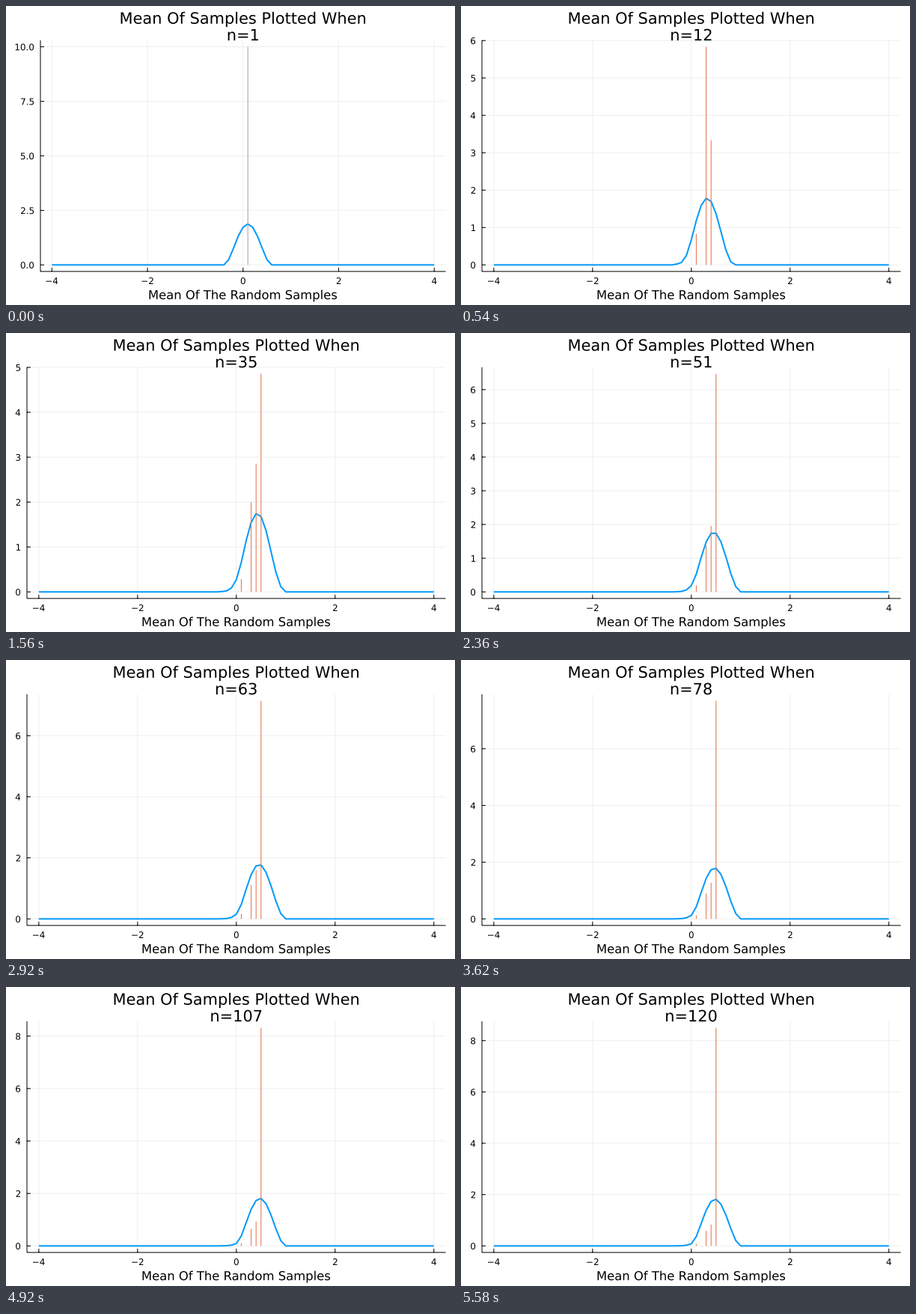
A matplotlib script for the animation above (5680 ms loop, 600 by 400 pixels).

```python
from functools import lru_cache

import numpy as np
import matplotlib.pyplot as plt
from matplotlib.animation import FuncAnimation
from matplotlib.patches import PathPatch
from matplotlib.path import Path
from matplotlib.textpath import TextPath

plt.rcParams["font.family"] = "DejaVu Sans"

W, H, DPI = 600, 400, 100
PX = 72 / DPI                     # one pixel in points
FRAMES, STEP_MS = 284, 20
TOP, BOTTOM, RIGHT = 45.8, 355.1, 587.6
PAD = 0.03                        # axis padding on each side of the data
TICK = 5
TITLE, LABEL, SMALL = 20.9, 16.42, 11.94
BLUE, ORANGE, GREY = "#009AFA", "#E36F47", "#A0A0A0"

# running means, rounded to one decimal, in the order they appear
MEANS = np.repeat([0.1, 0.3, 0.4, 0.5], [1, 7, 10, 102])
GRID = np.linspace(-4, 4, 81)
BANDWIDTH = 0.5

fig = plt.figure(figsize=(W / DPI, H / DPI), dpi=DPI, facecolor="white")
ax = fig.add_axes([0, 0, 1, 1])
ax.set(xlim=(0, W), ylim=(H, 0))
ax.axis("off")


def stroke(color, width, z):
    return ax.plot([], [], color=color, lw=width * PX, zorder=z, snap=False,
                   solid_capstyle="butt", solid_joinstyle="round")[0]


def set_segments(line, segments):
    """Show separate straight segments (x0, y0, x1, y1) with one line."""
    xs, ys = [], []
    for x0, y0, x1, y1 in segments:
        xs += [x0, x1, np.nan]
        ys += [y0, y1, np.nan]
    line.set_data(xs, ys)


@lru_cache(maxsize=None)
def outline(string, size):
    path = TextPath((0, 0), string, size=size)
    box = path.get_extents()
    return path.vertices * [1, -1], path.codes, box.x0, box.x1


class Label:
    """Text as an outline, so that it can sit between pixels."""

    def __init__(self, size, align=0.5):
        self.size, self.align = size, align
        self.patch = PathPatch(Path([(0, 0)]), fc="black", lw=0, zorder=6,
                               snap=False)
        ax.add_patch(self.patch)

    def show(self, string, x, baseline):
        vertices, codes, x0, x1 = outline(string, self.size)
        shift = x - x0 - self.align * (x1 - x0)
        self.patch.set_path(Path(vertices + [shift, baseline], codes))
        self.patch.set_visible(True)

    def hide(self):
        self.patch.set_visible(False)


grid = stroke("#EFEFEF", 1, 1)
frame = stroke("black", 1, 2)
curve = stroke(BLUE, 2, 3)
bars = stroke(ORANGE, 1, 4)

title, count, xlabel = Label(TITLE), Label(TITLE), Label(LABEL)
x_names = [Label(SMALL) for _ in range(5)]
y_names = [Label(SMALL, align=1) for _ in range(8)]


def density(samples):
    """Biweight kernel estimate on the grid."""
    u = (GRID[:, None] - samples) / BANDWIDTH
    k = 15 / 16 * np.clip(1 - u ** 2, 0, None) ** 2
    return k.mean(axis=1) / BANDWIDTH


def tick_step(n, top):
    if n == 1:
        return 2.5
    return 1 if top < 7 else 2


def sample_count(i):
    """Samples come in threes, the second one held for five ticks."""
    group, r = divmod(i, 7)
    return min(3 * group + (1 if r == 0 else 2 if r < 6 else 3), len(MEANS))


def draw(i):
    n = sample_count(i)
    samples = MEANS[:n]
    values, counts = np.unique(samples, return_counts=True)
    heights = 10 * counts / n
    peak = heights.max()
    left = 46 if n == 1 else 28
    mid = (left + RIGHT) / 2
    x_unit = (RIGHT - left) / (1 + 2 * PAD) / 8
    y_unit = (BOTTOM - TOP) / (1 + 2 * PAD) / peak
    zero = BOTTOM - PAD * peak * y_unit

    def px(x):
        return mid + x * x_unit

    def py(y):
        return zero - y * y_unit

    top = peak * (1 + PAD)
    x_ticks = np.arange(-4, 5, 2)
    y_ticks = np.arange(0, top, tick_step(n, top))

    set_segments(grid, [(px(x), TOP, px(x), BOTTOM) for x in x_ticks]
                 + [(left, py(y), RIGHT, py(y)) for y in y_ticks])
    set_segments(frame, [(left, TOP, left, BOTTOM),
                         (left, BOTTOM, RIGHT, BOTTOM)]
                 + [(px(x), BOTTOM, px(x), BOTTOM - TICK) for x in x_ticks]
                 + [(left, py(y), left + TICK, py(y)) for y in y_ticks])
    curve.set_data(px(GRID), py(density(samples)))
    set_segments(bars, [(px(x), zero, px(x), py(h))
                        for x, h in zip(values, heights)])
    bars.set_color(GREY if n == 1 else ORANGE)

    title.show("Mean Of Samples Plotted When", mid, 23.7)
    count.show(f"n={n}", mid, 46.1)
    xlabel.show("Mean Of The Random Samples", mid, 392.2)
    for name, x in zip(x_names, x_ticks):
        name.show(str(x).replace("-", "\u2212"), px(x), 372)
    for name in y_names:
        name.hide()
    for name, y in zip(y_names, y_ticks):
        name.show(f"{y:.1f}" if n == 1 else f"{y:.0f}", left - 8.9,
                  py(y) + 4.7)
    return []


anim = FuncAnimation(fig, draw, frames=FRAMES, interval=STEP_MS,
                     repeat=True, repeat_delay=0, blit=False)
plt.show()
```
